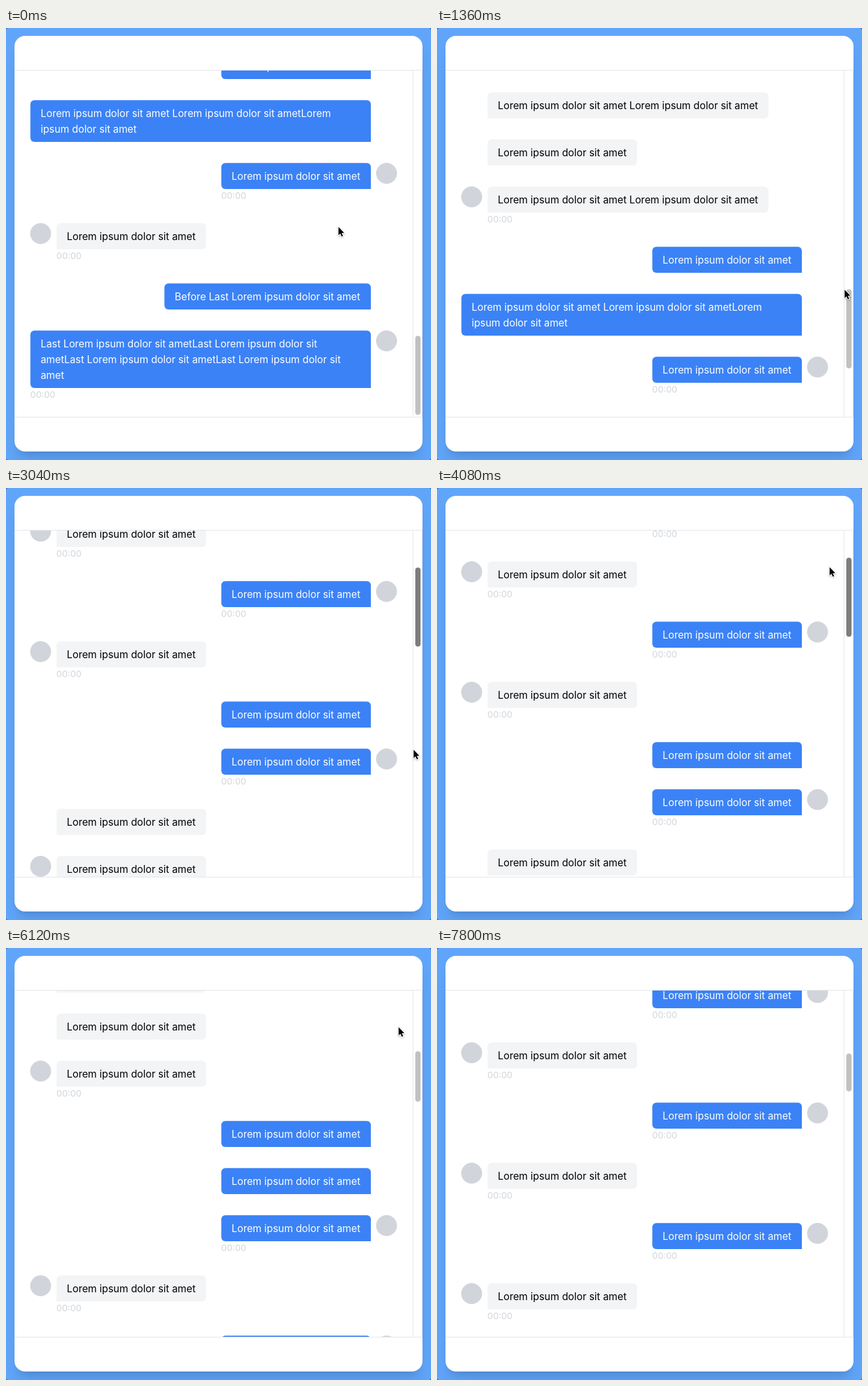
Recreate the animation shown at these times as an HTML page with a canvas. Size 650 by 660 pixels, loop 8.08 s.

```html
<!DOCTYPE html>
<html lang="en">
<head>
<meta charset="utf-8">
<title>Chat with infinite scroll</title>
<style>
  html, body { margin: 0; width: 650px; height: 660px; overflow: hidden; }
  html { background: #2d4468; }
  body { background: #60a5fa; border-radius: 3px; }
  .card {
    position: absolute; left: 13px; top: 12px; width: 624px; height: 635px;
    border-radius: 16px; background: #fff;
    box-shadow: 0 20px 25px -5px rgba(0, 0, 0, .1), 0 8px 10px -6px rgba(0, 0, 0, .1);
  }
  canvas { position: absolute; left: 0; top: 0; }
</style>
</head>
<body>
<div class="card"></div>
<canvas id="stage" width="650" height="660"></canvas>
<script>
const ctx = document.getElementById('stage').getContext('2d');
const LOOP = 8080, STEP = 40;
const TOP = 65, BOTTOM = 594, VIEW = BOTTOM - TOP, PAD = 24, GAP = 32;
const EDGE = .3; // bubbles sit slightly off the pixel grid
const FONT = 'Inter, "Liberation Sans", sans-serif';
const LOREM = 'Lorem ipsum dolor sit amet';

// Lower case: last of its group, with avatar and time.
const KINDS = {
  i: { width: 229, lines: [LOREM] },
  l: { width: 430, lines: [LOREM + ' ' + LOREM] },
  o: { out: true, width: 229, lines: [LOREM] },
  w: { out: true, width: 521, lines: [LOREM + ' ' + LOREM + 'Lorem', 'ipsum dolor sit amet'] },
  b: { out: true, width: 316, lines: ['Before Last ' + LOREM] },
  z: { out: true, width: 521, lines: [
    'Last ' + LOREM + 'Last Lorem ipsum dolor sit',
    'ametLast ' + LOREM + 'Last Lorem ipsum dolor sit',
    'amet'] }
};
// Newest page first; older pages are put above it as they load.
const PAGES = ['ioioiOoIiOOoioloLIlOWoiBz', 'ioiOOoIIiOOoio', 'oioioioioio'];
const LOADS = [4480, 7120];

const items = [];
const heights = [];
let y = BOTTOM - PAD + GAP;
PAGES.forEach((page, p) => {
  for (const c of [...page].reverse()) {
    const kind = KINDS[c.toLowerCase()];
    const ends = c === c.toLowerCase();
    const height = 16 + 24 * kind.lines.length;
    y -= height + (ends ? 20 : 0) + GAP;
    items.push({ ...kind, ends, height, y, page: p });
  }
  heights.push(BOTTOM - y + PAD);
});

// Time and distance scrolled up from the newest message.
const SCROLL = [[160, 0], [600, 20], [760, 20], [1360, 296], [2240, 897], [3240, 1498],
  [3320, 1498], [3880, 1516], [4080, 1518], [4960, 1883], [5600, 2150], [6120, 2274],
  [6280, 2274], [7000, 2760], [7800, 3086]];
const POINTER = [[160, 508, 303], [600, 623, 399], [3320, 623, 399], [3840, 600, 120],
  [7320, 600, 120], [7800, 604, 690]];

// Monotone cubic through the keys
const slopes = SCROLL.map((k, i) => {
  if (!i || i === SCROLL.length - 1) return 0;
  const rate = j => (SCROLL[j + 1][1] - SCROLL[j][1]) / (SCROLL[j + 1][0] - SCROLL[j][0]);
  const a = rate(i - 1), b = rate(i);
  return a * b > 0 ? 2 * a * b / (a + b) : 0;
});

function findSpan(keys, t) {
  let i = 0;
  while (i < keys.length - 2 && t > keys[i + 1][0]) i++;
  const span = keys[i + 1][0] - keys[i][0];
  const u = Math.min(1, Math.max(0, (t - keys[i][0]) / span));
  return { i, u, span };
}

function scrollAt(t) {
  const { i, u, span } = findSpan(SCROLL, t);
  const s = u * u * (3 - 2 * u), v = 1 - u;
  return SCROLL[i][1] * (1 - s) + SCROLL[i + 1][1] * s
    + span * u * v * (slopes[i] * v - slopes[i + 1] * u);
}

function pointerAt(t) {
  const { i, u } = findSpan(POINTER, t);
  const s = u * u * (3 - 2 * u), a = POINTER[i], b = POINTER[i + 1];
  return [a[1] + (b[1] - a[1]) * s, a[2] + (b[2] - a[2]) * s];
}

function box(x, y, w, h, radii, color) {
  ctx.fillStyle = color;
  ctx.beginPath();
  ctx.roundRect(x, y, w, h, radii);
  ctx.fill();
}

function text(str, x, y, size, color) {
  ctx.font = size + 'px ' + FONT;
  ctx.fillStyle = color;
  ctx.fillText(str, x, y);
}

function drawItem(m, y) {
  const x = m.out ? 558 - m.width : 77;
  box(x + EDGE, y + EDGE, m.width - EDGE, m.height - EDGE,
    m.out ? [6, 6, 0, 6] : [6, 6, 6, 0], m.out ? '#3b82f6' : '#f3f4f6');
  m.lines.forEach((line, i) =>
    text(line, x + 16, y + 26 + i * 24, 15.35, m.out ? '#fff' : '#000'));
  if (!m.ends) return;
  box(m.out ? 566 : 37, y, 32, 32, 16, '#d1d5db');
  text('00:00', x, y + m.height + 15, 13.7, '#d1d5db');
}

function drawScrollbar(height, scroll, dark) {
  const ratio = VIEW / height;
  ctx.fillStyle = '#e8e8e8';
  ctx.fillRect(622, TOP, 1, VIEW);
  ctx.fillRect(636, TOP, 1, VIEW);
  box(626, TOP + 3 + (height - VIEW - scroll) * ratio, 8, VIEW * ratio - 6, 4,
    dark ? '#7d7d7d' : '#c1c1c1');
}

function drawPointer(x, y) {
  ctx.save();
  ctx.translate(x + .5, y + 1);
  ctx.scale(.86, .86);
  ctx.beginPath();
  [[0, 0], [0, 14.5], [3.2, 11.6], [5.6, 17], [8, 16], [5.6, 10.7], [10, 10.4]]
    .forEach(([px, py]) => ctx.lineTo(px, py));
  ctx.closePath();
  ctx.lineWidth = 2;
  ctx.strokeStyle = '#fff';
  ctx.shadowColor = 'rgba(0,0,0,.3)';
  ctx.shadowBlur = 3;
  ctx.shadowOffsetY = 1;
  ctx.stroke();
  ctx.shadowColor = 'transparent';
  ctx.fillStyle = '#000';
  ctx.fill();
  ctx.restore();
}

function draw(t) {
  const scroll = Math.round(scrollAt(t));
  const loaded = LOADS.filter(at => t >= at).length;
  ctx.clearRect(0, 0, 650, 660);
  ctx.fillStyle = '#e5e7eb';
  ctx.fillRect(13, TOP - 1, 624, 1);
  ctx.fillRect(13, BOTTOM, 624, 1);
  ctx.save();
  ctx.beginPath();
  ctx.rect(13, TOP, 609, VIEW);
  ctx.clip();
  for (const m of items) {
    const top = m.y + scroll;
    if (m.page <= loaded && top < BOTTOM && top + m.height + 20 > TOP) drawItem(m, top);
  }
  ctx.restore();
  drawScrollbar(heights[loaded], scroll, t >= 1600 && t < LOADS[0]);
  drawPointer(...pointerAt(t));
}

const start = performance.now();
function tick() {
  const t = (performance.now() - start) % LOOP;
  draw(Math.floor(t / STEP) * STEP);
  requestAnimationFrame(tick);
}
tick();
</script>
</body>
</html>
```
